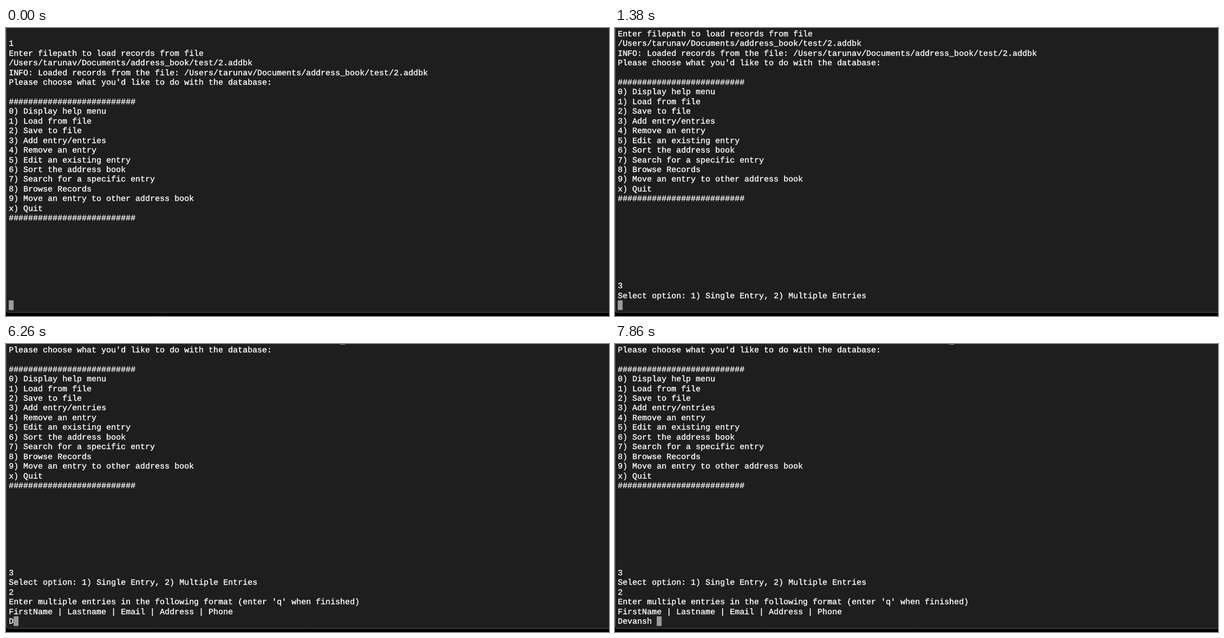
An HTML page with a canvas that plays this animation: 1080x518 px, repeating every 8000 ms.

```html
<!DOCTYPE html>
<html lang="en">
<head>
<meta charset="utf-8">
<title>Address book terminal</title>
<style>
  html, body { margin: 0; width: 100%; height: 100%; overflow: hidden; background: #000; }
  canvas { display: block; width: 1080px; height: 518px; }
</style>
</head>
<body>
<canvas id="stage" width="1080" height="518"></canvas>
<script>
const ctx = document.getElementById('stage').getContext('2d');
const LOOP = 8000;
const LEFT = 4.9, COL = 8.73, ROW = 17.44;
const LAST_TOP = 489.8, BASELINE = 503.1;
const PATH = '/Users/tarunav/Documents/address_book/test/2.addbk';
const LOADED = 'INFO: Loaded records from the file: ' + PATH;
const RULE = '#'.repeat(26);

const menu = [
  '', '1',
  'Enter filepath to load records from file',
  PATH,
  LOADED,
  "Please choose what you'd like to do with the database:",
  '', RULE,
  '0) Display help menu',
  '1) Load from file',
  '2) Save to file',
  '3) Add entry/entries',
  '4) Remove an entry',
  '5) Edit an existing entry',
  '6) Sort the address book',
  '7) Search for a specific entry',
  '8) Browse Records',
  '9) Move an entry to other address book',
  'x) Quit',
  RULE,
  ...Array(8).fill('')
];
const choice = [...menu, '3', 'Select option: 1) Single Entry, 2) Multiple Entries'];
const entry = [
  ...choice, '2',
  "Enter multiple entries in the following format (enter 'q' when finished)",
  'FirstName | Lastname | Email | Address | Phone'
];

// Each prompt: start time, finished lines, typed text and its key times
const prompts = [
  { start: 0, lines: menu, text: '3', keys: [1110] },
  { start: 1380, lines: choice, text: '2', keys: [2930] },
  { start: 3650, lines: entry, text: 'Devansh ',
    keys: [6260, 6640, 6730, 6820, 7060, 7240, 7330, 7860] }
];

const colX = col => LEFT + col * COL;

function drawLine(text, y) {
  ctx.fillText(text, LEFT, y);
  ctx.strokeText(text, LEFT, y);
}

function drawWindow() {
  ctx.fillStyle = '#000';
  ctx.fillRect(0, 0, 1080, 518);
  ctx.beginPath();
  ctx.roundRect(0.5, -20, 1100, 531.5, 4);
  ctx.fillStyle = '#1e1e1e';
  ctx.fill();
  ctx.strokeStyle = '#555';
  ctx.lineWidth = 1;
  ctx.stroke();
}

function draw(time) {
  const prompt = prompts.findLast(p => time >= p.start);
  const typed = prompt.text.slice(0, prompt.keys.filter(k => time >= k).length);
  const rows = [...prompt.lines, typed].slice(-29);

  drawWindow();
  ctx.font = '14.55px "Liberation Mono", monospace';
  ctx.textRendering = 'geometricPrecision';
  ctx.fontKerning = 'none';
  ctx.fillStyle = ctx.strokeStyle = '#fff';
  ctx.lineWidth = 0.35;
  rows.forEach((row, i) => drawLine(row, BASELINE - (rows.length - 1 - i) * ROW));

  // Underscore of the line that has just scrolled off the top
  if (prompt.lines === entry) {
    ctx.fillStyle = '#999';
    ctx.fillRect(colX(LOADED.indexOf('_')), 0, COL, 1);
  }

  ctx.fillStyle = '#9b9b9b';
  ctx.fillRect(colX(typed.length), LAST_TOP, COL, ROW);
}

const origin = performance.now();
function tick() {
  draw((performance.now() - origin) % LOOP);
  requestAnimationFrame(tick);
}
tick();
</script>
</body>
</html>
```
